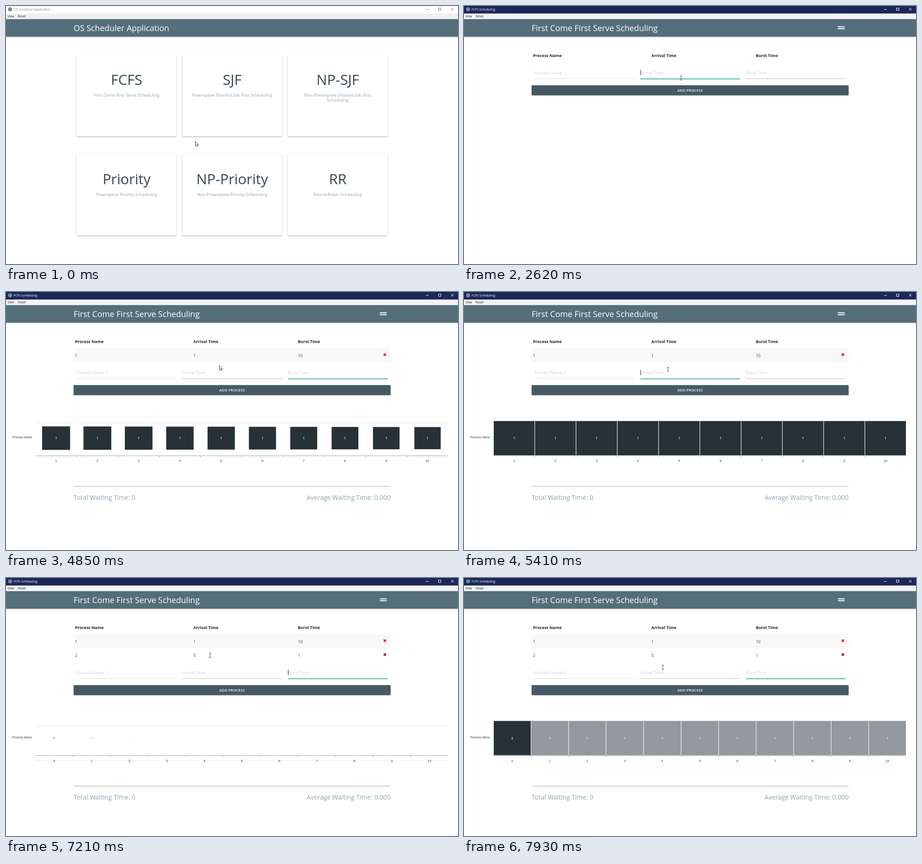
These frames come from a looping animation (989 by 566 pixels, 8 s). An HTML page with a canvas:

```html
<!DOCTYPE html>
<html lang="en">
<head>
<meta charset="utf-8">
<title>OS Scheduler Application</title>
<style>
html, body { margin: 0; width: 100%; height: 100%; overflow: hidden; background: #fff; }
canvas { display: block; }
</style>
</head>
<body>
<canvas id="stage" width="989" height="566"></canvas>
<script>
const ctx = document.getElementById('stage').getContext('2d');
const LOOP = 8000;
const UI = '"Open Sans", "Noto Sans", sans-serif';
const CHART = '"Liberation Sans", Arial, sans-serif';
const ROW = 30.5;
const COLS = [155, 386, 617];
const SLATE = '#546e7a', INK = '#37474f', MUTED = '#90a4ae', DARK = '#263238';

const clamp = v => Math.min(1, Math.max(0, v));
const ramp = (t, from, len) => clamp((t - from) / len);
const mix = (a, b, k) => a + (b - a) * k;
const inOut = k => k * k * (3 - 2 * k);
const outSine = k => Math.sin(k * Math.PI / 2);

function rect(x, y, w, h, color) {
  ctx.fillStyle = color;
  ctx.fillRect(x, y, w, h);
}

function text(str, x, y, size, color, { align = 'left', weight = 400, family = UI, gap = 0 } = {}) {
  ctx.font = `${weight} ${size}px ${family}`;
  ctx.letterSpacing = gap + 'px';
  ctx.textAlign = align;
  ctx.fillStyle = color;
  ctx.fillText(str, x, y);
}

function lines(points, color, width) {
  ctx.strokeStyle = color;
  ctx.lineWidth = width;
  ctx.beginPath();
  for (const [x1, y1, x2, y2] of points) {
    ctx.moveTo(x1, y1);
    ctx.lineTo(x2, y2);
  }
  ctx.stroke();
}

function cross(x, y, r, color, width) {
  lines([[x - r, y - r, x + r, y + r], [x - r, y + r, x + r, y - r]], color, width);
}

// Box with stacked drop shadows: [dx, dy, blur, color]
function box(x, y, w, h, color, shadows) {
  ctx.save();
  ctx.fillStyle = color;
  ctx.beginPath();
  ctx.roundRect(x, y, w, h, 1.2);
  for (const [dx, dy, blur, shade] of shadows) {
    ctx.shadowOffsetX = dx;
    ctx.shadowOffsetY = dy;
    ctx.shadowBlur = blur;
    ctx.shadowColor = shade;
    ctx.fill();
  }
  ctx.restore();
}

const raised = (k = 1) => [
  [0, 1.2, 1.2, `rgba(0,0,0,${0.24 * k})`],
  [0, 0.6, 3, `rgba(0,0,0,${0.2 * k})`]
];

function drawWindow(t) {
  const active = t >= 780;
  const ink = active ? '#fff' : '#777';
  rect(0, 0, 989, 17, active ? '#1c2859' : '#fff');
  ctx.fillStyle = '#6d8c99';
  ctx.beginPath();
  ctx.arc(9, 7.3, 4.5, 0, 7);
  ctx.fill();
  text(t < 1290 ? 'OS Scheduler Application' : 'FCFS Scheduling', 16.7, 10.2, 6.8, active ? '#fff' : '#888');
  lines([[919, 7.5, 925, 7.5]], ink, 1);
  ctx.strokeRect(946.5, 4.5, 5, 5);
  cross(976.5, 7, 2.9, ink, 1);
  rect(0, 16.5, 989, 12.2, active ? '#f3f2f5' : '#f0f0f0');
  text('View', 3, 25, 6.7, '#222');
  text('Reset', 25.8, 25, 6.7, '#222');
}

function drawNav(title, menu) {
  box(-4, 28.5, 997, 38.5, SLATE, raised());
  text(title, 148, 55.3, 17.85, '#fff');
  if (menu) {
    rect(818, 44.6, 15, 2.1, '#fff');
    rect(818, 48.8, 15, 2.1, '#fff');
  }
}

const cards = [
  ['FCFS', 'First Come First Serve Scheduling'],
  ['SJF', 'Preemptive Shortest Job First Scheduling'],
  ['NP-SJF', 'Non-Preemptive Shortest Job First', 'Scheduling'],
  ['Priority', 'Preemptive Priority Scheduling'],
  ['NP-Priority', 'Non-Preemptive Priority Scheduling'],
  ['RR', 'Round-Robin Scheduling']
];

function drawHome(t) {
  const hover = inOut(ramp(t, 760, 300));
  drawNav('OS Scheduler Application', false);
  cards.forEach(([name, ...about], i) => {
    const x = COLS[i % 3] - 0.3, y = i < 3 ? 107.3 : 324.2, mid = x + 109.2;
    const shadows = raised(i ? 1 : 1 - hover * 0.6);
    if (!i && hover) shadows.push([1, 2, 11, `rgba(69,90,100,${0.75 * hover})`]);
    box(x, y, 218, i < 3 ? 179 : 179.3, '#fff', shadows);
    const base = i < 3 ? 172.8 : 390.6;
    text(name, mid, base, 31, INK, { align: 'center' });
    about.forEach((s, n) => text(s, mid, base + 26 + n * 11, 9.3, MUTED, { align: 'center' }));
  });
}

// Moments at which the text caret switches on or off
const blinks = [2500, 2820, 2990, 3290, 3380, 3760, 3770, 4050, 4280, 4710, 5010,
  6080, 6410, 7010, 7210, 7310, 7610, 7910];

// [from, to, value]
const arrivalKeys = [[2990, 3380, '0'], [3460, 4610, '1'], [5570, 7210, '0']];
const burstKeys = [[4280, 4380, '1'], [4380, 4610, '10'], [6710, 7210, '1']];

const typed = (keys, t) => (keys.find(k => t >= k[0] && t < k[1]) || [0, 0, ''])[2];
const focus = (t, spans) => spans.reduce((k, [a, b]) => k + ramp(t, a, 120) - ramp(t, b, 120), 0);

function drawField(x, y, hint, value, lit, caret) {
  text(value || hint, x, y + 149.8, 9, value ? '#222' : '#d0d0d0');
  const shade = [[158, 38], [158, 166], [158, 154]].map(([a, b]) => Math.round(mix(a, b, lit)));
  rect(x, y + 159.2, 218, 0.7 + 0.9 * lit, `rgb(${shade})`);
  if (caret) {
    ctx.font = `400 9px ${UI}`;
    const w = value ? ctx.measureText(value).width : 0;
    rect(x + w, y + 140, 0.9, 12, '#111');
  }
}

function drawForm(t, rows) {
  const y = rows * ROW;
  const columns = [151, 410, 638.5];
  ['Process Name', 'Arrival Time', 'Burst Time'].forEach((s, i) =>
    text(s, columns[i], 112.2, 8.95, '#222', { weight: 700 }));

  const data = [['1', '1', '10'], ['2', '0', '1']];
  for (let r = 0; r < rows; r++) {
    if (!r) rect(148, 123.6, 693.5, ROW, '#f8f8f8');
    data[r].forEach((s, i) => text(s, columns[i], 142.8 + r * ROW, 9, '#444'));
    cross(829, 137.5 + r * ROW, 2.5, r ? '#701a20' : '#f01010', 2.1);
  }

  const onArrival = focus(t, [[2500, 3770], [5280, 5830]]);
  const onBurst = focus(t, [[3770, 5280], [5830, 9000]]);
  const inArrival = t < 3770 || (t >= 5280 && t < 5830);
  const blink = blinks.filter(b => b <= t).length % 2 === 1;
  text('Process Name: ' + (rows + 1), 154.5, y + 149.8, 9, '#d0d0d0');
  ctx.setLineDash([0.6, 0.6]);
  lines([[154.5, y + 159.6, 373, y + 159.6]], '#aaa', 0.8);
  ctx.setLineDash([]);
  drawField(386, y, 'Arrival Time', typed(arrivalKeys, t), onArrival, blink && inArrival);
  drawField(617, y, 'Burst Time', typed(burstKeys, t), onBurst, blink && !inArrival);

  box(148, y + 174, 693.3, 21.4, '#455a64', raised());
  text('ADD PROCESS', 494.8, y + 187.5, 7.9, '#fff', { align: 'center', weight: 600, gap: 0.25 });
}

function drawChart(t, rows) {
  const dy = (rows - 1) * ROW;
  const count = rows === 1 ? 10 : 11;
  const start = rows === 1 ? 4634 : 7202;
  const left = 64.5, step = 903 / count;
  const grow = i => outSine(ramp(t, start + i * 1.7, 450));
  const drop = 11.7 * (1 - grow(0));

  lines([283.2, 358.4].map(y => [left, y + dy + drop, left + 903, y + dy + drop]), '#e2e2e2', 0.8);
  const axis = [[left, 359 + dy, left + 903, 359 + dy]];
  for (let i = 1; i < count; i++) axis.push([left + i * step, 359 + dy, left + i * step, 362.5 + dy]);
  lines(axis, '#8fa0a5', 0.9);
  text('Process Name', 13.7, 321.3 + dy, 6.6, '#373d3f', { family: CHART });

  for (let i = 0; i < count; i++) {
    const mid = left + (i + 0.5) * step;
    const k = grow(i), w = (step - 1.1) * k, h = 75 * k;
    rect(mid - w / 2, 320.6 + dy - h / 2, w, h, rows === 2 && i ? '#93999c' : DARK);
    text(rows === 2 && !i ? '2' : '1', mid, 323.1 + dy, 7, '#fff', { align: 'center', weight: 600 });
    text(String(rows === 1 ? i + 1 : i), mid, 373.2 + dy, 7.2, '#373d3f', { align: 'center', family: CHART });
  }

  rect(148, 425.8 + dy, 693.5, 0.9, '#999');
  text('Total Waiting Time: 0', 148, 455.6 + dy, 14, MUTED);
  text('Average Waiting Time: 0.000', 841.5, 455.6 + dy, 14, MUTED, { align: 'right' });
}

const arrow = new Path2D('M0 0V9.6L2.2 7.6L3.8 11.2L5.5 10.4L3.9 7H6.9Z');
const hand = new Path2D('M-1 1Q-1 0 0 0T1 1V5Q2.4 4.4 2.8 5.4Q4.1 4.8 4.4 5.9Q5.8 5.6 5.8 7V9.5' +
  'Q5.8 11 4.8 12V13.4H-.6V12.3L-3.6 8.6Q-4.2 7.4 -3 7.1Q-2 7.2 -1 8.6Z');

function drawCursor(kind, x, y) {
  ctx.save();
  ctx.translate(x, y);
  if (kind === 'beam') {
    lines([[0, -4.5, 0, 4.5], [-2, -4.7, 2, -4.7], [-2, 4.7, 2, 4.7]], '#333', 0.9);
  } else {
    const path = kind === 'hand' ? hand : arrow;
    ctx.fillStyle = '#fff';
    ctx.fill(path);
    ctx.strokeStyle = '#222';
    ctx.lineWidth = 0.9;
    ctx.stroke(path);
  }
  ctx.restore();
}

// [start, length, x, y]
const moves = [[400, 150, 359.2, 248.6], [1770, 560, 475, 158], [4640, 600, 446.5, 169.7], [7600, 330, 435, 196]];

function pointer(t) {
  let x = 414.4, y = 297.2;
  for (const [start, len, toX, toY] of moves) {
    const k = inOut(ramp(t, start, len));
    x = mix(x, toX, k);
    y = mix(y, toY, k);
  }
  let kind = 'arrow';
  if (t >= 780 && t < 1320) kind = 'hand';
  else if (t >= 1790 && t < 4610) kind = y < 161 ? 'beam' : 'arrow';
  else if (t >= 4610 && t < 7600) kind = y > 166 ? 'beam' : 'arrow';
  else if (t >= 7600) kind = y < 171 || y > 193 ? 'beam' : 'arrow';
  return [kind, x, y];
}

function draw(t) {
  rect(0, 0, 989, 566, '#fff');
  if (t < 1490) {
    drawHome(t);
  } else {
    const rows = t < 4610 ? 0 : t < 7210 ? 1 : 2;
    drawNav('First Come First Serve Scheduling', true);
    drawForm(t, rows);
    if (rows) drawChart(t, rows);
  }
  drawWindow(t);
  drawCursor(...pointer(t));
}

const begin = performance.now();
function tick() {
  draw((performance.now() - begin) % LOOP);
  requestAnimationFrame(tick);
}
tick();
</script>
</body>
</html>
```
